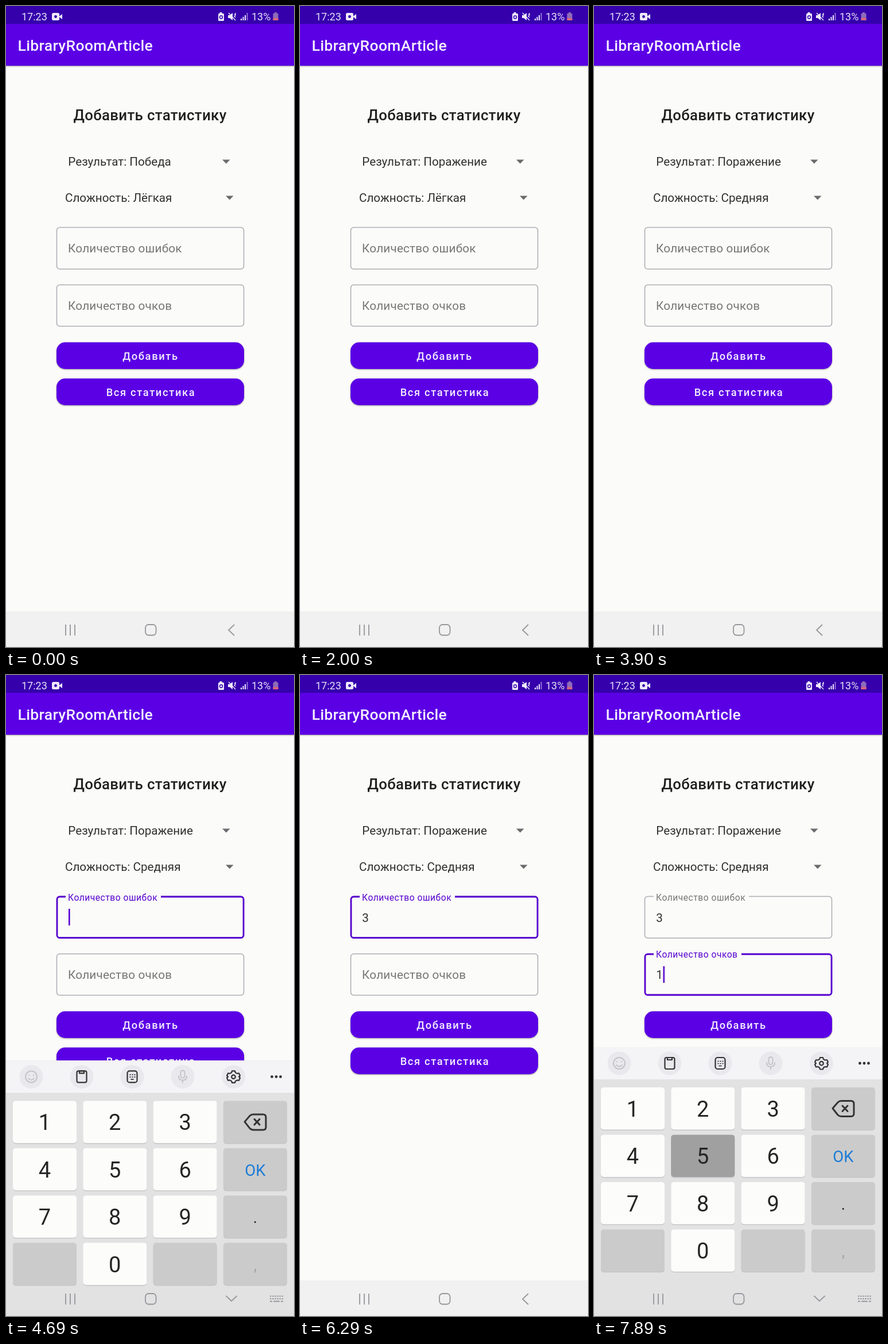
Recreate the animation shown at these times as an HTML page. Size 502x1116 px, loop 7.99 s.

```html
<!DOCTYPE html>
<html lang="ru">
<head>
<meta charset="utf-8">
<title>LibraryRoomArticle</title>
<style>
:root { --page: #fbfbf9; --ink: #303030; --violet: #5b00e5; --accent: #5600d0; --grey: #777; --key: #fcfcfb; --held: #a0a0a0; }
html, body { margin: 0; width: 100%; height: 100%; overflow: hidden; background: var(--page); }
svg { display: block; width: 502px; height: 1116px; font-family: Roboto, "Noto Sans", sans-serif; }

.bar { font-size: 26.5px; font-weight: 500; letter-spacing: .0125em; }
.heading { font-size: 25.8px; font-weight: 500; letter-spacing: .0125em; text-anchor: middle; fill: #202020; }
.item { font-size: 20.65px; fill: var(--ink); }
.label { font-size: 20.7px; letter-spacing: .2px; fill: var(--grey); }
.button { font-size: 18.3px; font-weight: 500; letter-spacing: .0893em; fill: #f3edff; text-anchor: middle; }
.status { font-size: 18px; fill: #e9e3fa; }
.key { font-size: 38px; fill: #252525; text-anchor: middle; }
.small { font-size: 27.5px; }
.page { fill: var(--page); }
.raised { fill: var(--violet); filter: drop-shadow(0 1px .8px #0006); }
.popup { fill: #fcfcfb; filter: drop-shadow(0 5px 9px #0003); }
.line { fill: none; stroke: #96969b; stroke-width: 1.8; }
.dark { fill: none; stroke: #333; stroke-width: 2.2; stroke-linejoin: round; stroke-linecap: round; }
.pale { fill: none; stroke: #c4c4c9; stroke-width: 2; stroke-linecap: round; }
.box { fill: none; stroke: #adadb5; stroke-width: 1.6; }
.focus { fill: none; stroke: var(--accent); stroke-width: 2.8; }
.caret { fill: var(--accent); }
.gap { fill: var(--page); transform-box: fill-box; transform-origin: center; }

/* One shared 7.99 s clock */
[class*="t-"] { animation: 7.99s linear infinite; }
.step { animation-timing-function: step-end !important; }

.t-win { animation-name: win; }
.t-loss { animation-name: loss; }
@keyframes win { 0% { opacity: 1 } 16.27%, 100% { opacity: 0 } }
@keyframes loss { 0% { opacity: 0 } 16.27%, 100% { opacity: 1 } }
.t-easy { animation-name: easy; }
.t-mid { animation-name: mid; }
@keyframes easy { 0% { opacity: 1 } 43.8%, 100% { opacity: 0 } }
@keyframes mid { 0% { opacity: 0 } 43.8%, 100% { opacity: 1 } }

.t-pop1 { animation-name: pop1; }
@keyframes pop1 { 0%, 7.51% { opacity: 0 } 9.39%, 16.3% { opacity: 1 } 18.15%, 100% { opacity: 0 } }
.t-pop2 { animation-name: pop2; }
@keyframes pop2 { 0%, 31.29% { opacity: 0 } 33.17%, 43.8% { opacity: 1 } 45.68%, 100% { opacity: 0 } }

.t-tap1 { animation-name: tap1; }
@keyframes tap1 { 0%, 6.26% { r: 8px; opacity: 0 } 7.51% { r: 22px; opacity: .1 } 9.4%, 11.26% { r: 26px; opacity: .1 } 13.77%, 100% { r: 26px; opacity: 0 } }
.t-tap2 { animation-name: tap2; }
@keyframes tap2 { 0%, 30.04% { r: 8px; opacity: 0 } 31.29% { r: 22px; opacity: .1 } 33.17%, 36.4% { r: 26px; opacity: .1 } 38.8%, 100% { r: 26px; opacity: 0 } }
.t-pick1 { animation-name: pick1; }
@keyframes pick1 { 0%, 13.1% { r: 20px; opacity: 0 } 13.77% { r: 50px; opacity: .1 } 15.02% { r: 89px; opacity: .1 } 16.27% { r: 140px; opacity: .08 } 17.5%, 100% { r: 150px; opacity: 0 } }
.t-pick2 { animation-name: pick2; }
@keyframes pick2 { 0%, 40.7% { r: 20px; opacity: 0 } 41.3% { r: 50px; opacity: .1 } 42.55% { r: 89px; opacity: .1 } 43.8% { r: 140px; opacity: .08 } 45.06%, 100% { r: 150px; opacity: 0 } }

.t-label1 { animation-name: label1; }
@keyframes label1 {
  0%, 53.82% { transform: none; font-size: 20.7px; letter-spacing: .2px; fill: var(--grey) }
  55.94%, 84.98% { transform: translateY(-36.5px); font-size: 15.6px; letter-spacing: .52px; fill: var(--accent) }
  85.2%, 100% { transform: translateY(-36.5px); font-size: 15.6px; letter-spacing: .52px; fill: var(--grey) }
}
.t-label2 { animation-name: label2; }
@keyframes label2 {
  0%, 84.98% { transform: none; font-size: 20.7px; letter-spacing: .2px; fill: var(--grey) }
  87.11%, 100% { transform: translateY(-36.5px); font-size: 15.6px; letter-spacing: .52px; fill: var(--accent) }
}
.t-focus1 { animation-name: focus1; }
@keyframes focus1 { 0% { opacity: 0 } 53.82% { opacity: 1 } 84.98%, 100% { opacity: 0 } }
.t-focus2 { animation-name: focus2; }
@keyframes focus2 { 0% { opacity: 0 } 84.98%, 100% { opacity: 1 } }
.t-gap1 { animation-name: gap1; }
@keyframes gap1 { 0%, 53.82% { transform: scaleX(0) } 55.94%, 100% { transform: none } }
.t-gap2 { animation-name: gap2; }
@keyframes gap2 { 0%, 84.98% { transform: scaleX(0) } 87.11%, 100% { transform: none } }

.t-three { animation-name: three; }
@keyframes three { 0% { opacity: 0 } 66.33%, 100% { opacity: 1 } }
.t-one { animation-name: one; }
@keyframes one { 0% { opacity: 0 } 94.99%, 100% { opacity: 1 } }
.t-caret1 { animation-name: caret1; }
@keyframes caret1 {
  0% { opacity: 0 } 53.82% { opacity: 1 } 60.08% { opacity: 0 }
  66.33% { opacity: 1; transform: translateX(11.5px) } 72.47% { opacity: 0; transform: translateX(11.5px) }
  78.85% { opacity: 1; transform: translateX(11.5px) } 84.98%, 100% { opacity: 0 }
}
.t-caret2 { animation-name: caret2; }
@keyframes caret2 {
  0% { opacity: 0 } 85.5% { opacity: 1 } 91.8% { opacity: 0 }
  94.99%, 100% { opacity: 1; transform: translateX(11.5px) }
}

.t-keys { animation-name: keys; }
@keyframes keys {
  0%, 56.32% { transform: translateY(470px); animation-timing-function: cubic-bezier(.2, .6, .3, 1) }
  60.08%, 74.97% { transform: none; animation-timing-function: cubic-bezier(.4, 0, .7, .6) }
  78.72%, 88.86% { transform: translateY(470px); animation-timing-function: cubic-bezier(.2, .6, .3, 1) }
  91.24%, 100% { transform: none }
}
.t-back { animation-name: back; }
@keyframes back { 0% { opacity: 1 } 56.4% { opacity: 0 } 76% { opacity: 1 } 88.9%, 100% { opacity: 0 } }
.t-down { animation-name: down; }
@keyframes down { 0% { opacity: 0 } 56.4% { opacity: 1 } 76% { opacity: 0 } 88.9%, 100% { opacity: 1 } }

.t-press1 { animation-name: press1; }
@keyframes press1 { 0% { fill: var(--key) } 93.7% { fill: var(--held) } 96.2%, 100% { fill: var(--key) } }
.t-press3 { animation-name: press3; }
@keyframes press3 { 0% { fill: var(--key) } 66.2% { fill: var(--held) } 67.5%, 100% { fill: var(--key) } }
.t-press5 { animation-name: press5; }
@keyframes press5 { 0% { fill: var(--key) } 98.6%, 100% { fill: var(--held) } }
.t-pressOK { animation-name: pressOK; }
@keyframes pressOK { 0% { fill: #cbcbcb } 72.4% { fill: var(--held) } 74.9%, 100% { fill: #cbcbcb } }
.t-ok { animation-name: ok; }
@keyframes ok { 0% { fill: #1b7bd8 } 72.4% { fill: #333 } 74.9%, 100% { fill: #1b7bd8 } }
</style>
</head>
<body>
<svg viewBox="0 0 502 1116">
  <defs>
    <clipPath id="row1"><rect x="87" y="303" width="266" height="62"/></clipPath>
    <clipPath id="row2"><rect x="83" y="364" width="275" height="62"/></clipPath>
  </defs>
  <rect class="page" width="502" height="1116"/>

  <!-- Status and app bar -->
  <rect class="raised" y="30" width="502" height="74"/>
  <rect width="502" height="31" fill="#3500ac"/>
  <text class="status" x="27" y="25">17:23</text>
  <text class="status" x="428" y="25">13%</text>
  <g fill="#eee9fb">
    <rect x="80" y="12" width="13" height="13" rx="2.5"/>
    <path d="M92 18.5 98 14V23Z"/>
    <circle cx="86.5" cy="18.5" r="2.4" fill="#3500ac"/>
    <path d="M372.5 11h4v2h2q1.5 0 1.5 1.5v10q0 1.5-1.5 1.5h-7q-1.5 0-1.5-1.5v-10q0-1.5 1.5-1.5h1z"/>
    <circle cx="375" cy="19.5" r="2.5" fill="none" stroke="#3500ac" stroke-width="1.4"/>
    <path d="M387 16h3l5-4v13l-5-4h-3z"/>
    <path d="M388 12 400 25M398 14l2 2-2 2 2 2M400 12v3" fill="none" stroke="#eee9fb" stroke-width="1.3"/>
    <path d="M409 22h2v3h-2zM412.5 19h2v6h-2zM416 16h2v9h-2z"/>
    <path d="M419.5 12h2v13h-2z" opacity=".5"/>
  </g>
  <path d="M468 11h4v2h2.5v12h-9V13h2.5z" fill="#8f6cb9"/>
  <path d="M465.5 21h9v4h-9z" fill="#d8637c"/>
  <text class="bar" x="20.5" y="78" fill="#f5f0ff">LibraryRoomArticle</text>

  <!-- Form -->
  <text class="heading" x="251" y="199">Добавить статистику</text>
  <circle class="t-tap1" cx="384" cy="271" r="8" opacity="0"/>
  <circle class="t-tap2" cx="389" cy="333.5" r="8" opacity="0"/>
  <path d="M377 267.5h13.5l-6.75 7zM383 330.5h13.5l-6.75 7z" fill="#6b6b6e"/>
  <g class="item">
    <text class="t-win step" x="108.3" y="278">Результат: Победа</text>
    <text class="t-loss step" x="108.3" y="278" opacity="0">Результат: Поражение</text>
    <text class="t-easy step" x="103" y="341">Сложность: Лёгкая</text>
    <text class="t-mid step" x="103" y="341" opacity="0">Сложность: Средняя</text>
  </g>

  <rect class="box" x="88.5" y="385.5" width="326" height="72.5" rx="5"/>
  <rect class="focus t-focus1 step" x="89" y="386" width="325" height="71.5" rx="4.5" opacity="0"/>
  <rect class="gap t-gap1" x="104" y="382" width="166" height="8"/>
  <text class="label t-label1" x="108.1" y="429">Количество ошибок</text>
  <text class="item t-three step" x="108.3" y="430" opacity="0">3</text>
  <rect class="caret t-caret1 step" x="109" y="407" width="2.6" height="29" opacity="0"/>

  <rect class="box" x="88.5" y="485.5" width="326" height="72" rx="5"/>
  <rect class="focus t-focus2 step" x="89" y="486" width="325" height="71" rx="4.5" opacity="0"/>
  <rect class="gap t-gap2" x="104" y="482" width="153" height="8"/>
  <text class="label t-label2" x="108.1" y="528.5">Количество очков</text>
  <text class="item t-one step" x="108.3" y="529" opacity="0">1</text>
  <rect class="caret t-caret2 step" x="109" y="507" width="2.6" height="29" opacity="0"/>

  <g class="raised">
    <rect x="88" y="585.5" width="327" height="46.5" rx="15"/>
    <rect x="88" y="648.5" width="327" height="46.5" rx="15"/>
  </g>
  <text class="button" x="252" y="616">Добавить</text>
  <text class="button" x="252.5" y="679">Вся статистика</text>

  <!-- Drop-down lists -->
  <g class="t-pop1" opacity="0">
    <rect class="popup" x="87" y="238" width="266" height="127"/>
    <g clip-path="url(#row1)"><circle class="t-pick1" cx="219.5" cy="334" r="20" opacity="0"/></g>
    <g class="item">
      <text x="108.3" y="278">Результат: Победа</text>
      <text x="108.3" y="341">Результат: Поражение</text>
    </g>
  </g>
  <g class="t-pop2" opacity="0">
    <rect class="popup" x="83" y="301" width="275.5" height="248"/>
    <g clip-path="url(#row2)"><circle class="t-pick2" cx="220" cy="395" r="20" opacity="0"/></g>
    <g class="item">
      <text x="103.8" y="339">Сложность: Лёгкая</text>
      <text x="103.8" y="402">Сложность: Средняя</text>
      <text x="103.8" y="465">Сложность: Сложная</text>
      <text x="103.8" y="527.5">Сложность: Экспертная</text>
    </g>
  </g>

  <!-- Keyboard -->
  <rect y="1054" width="502" height="62" fill="#f1f1f1"/>
  <g class="t-keys">
    <rect y="648" width="502" height="468" fill="#e2e2e3"/>
    <rect y="648" width="502" height="56" fill="#f4f4f6"/>
    <g fill="#e9e9ed">
      <circle cx="44" cy="676" r="20.5"/><circle cx="132" cy="676" r="20.5"/>
      <circle cx="220" cy="676" r="20.5"/><circle cx="308" cy="676" r="20.5"/>
      <circle cx="396.5" cy="676" r="20.5"/>
    </g>
    <g class="pale">
      <circle cx="44" cy="676" r="10"/>
      <path d="M40 673v.5M48 673v.5M39 679q5 5 10 0"/>
      <rect x="304.5" y="665" width="7" height="13" rx="3.5"/>
      <path d="M301 675q0 7 7 7t7-7M308 682v4"/>
    </g>
    <g class="dark">
      <rect x="123.5" y="666" width="17" height="20" rx="3"/>
      <path d="M128 666v4h8v-4z"/>
      <rect x="211.5" y="666" width="17" height="20" rx="4"/>
      <path d="M216 672.5h1M220 672.5h1M224 672.5h1M216 676.5h1M220 676.5h1M224 676.5h1M218 680.5h4" stroke-width="1.6"/>
      <path d="M394 666h5l1 3 3 1.5 3-.5 2 4-2 2 2 2-2 4.5-3-.5-3 1.5-1 3h-5l-1-3-3-1.5-3 .5-2-4.5 2-2-2-2 2-4 3 .5 3-1.5z"/>
      <circle cx="396.5" cy="676.2" r="3.3"/>
    </g>
    <g fill="#333"><circle cx="463.5" cy="676" r="2.4"/><circle cx="471" cy="676" r="2.4"/><circle cx="478.5" cy="676" r="2.4"/></g>
    <g id="keys"></g>
    <path class="dark" style="stroke-width: 3" d="M416 754.5 425 744q2.5-2.5 6-2.5h17q5 0 5 5v17q0 5-5 5h-17q-3.5 0-6-2.5zM433 750l9 9.5M442 750l-9 9.5"/>
  </g>

  <!-- Navigation bar -->
  <g class="line">
    <path d="M104 1077v19M112 1077v19M120 1077v19"/>
    <rect x="243" y="1077" width="18.5" height="18.5" rx="5.5"/>
    <path class="t-back step" d="M398 1077 388 1086.5 398 1096"/>
    <g class="t-down step" opacity="0">
      <path d="M383.5 1081 393 1090 402.5 1081"/>
      <path d="M460 1081.5h23M460 1086h23" stroke-dasharray="2.5 1.6"/>
      <path d="M460 1090.5h4M466 1090.5h11M479 1090.5h4"/>
    </g>
  </g>
</svg>
<script>
const rows = [["1", "2", "3", "del"], ["4", "5", "6", "OK"], ["7", "8", "9", "."], ["", "0", "", ","]];
const pressed = ["1", "3", "5", "OK"];

function drawKey(name, col, row) {
  const x = 12 + col * 122.3, y = 718 + row * 82.4;
  const digit = /\d/.test(name);
  const press = pressed.includes(name) ? `t-press${name} step` : "";
  const box = (top, fill, cls) =>
    `<rect class="${cls}" x="${x}" y="${top}" width="111" height="73.5" rx="5" fill="${fill}"/>`;
  const cap = box(y + 1.5, "#c6c6c8", "") + box(y, digit ? "var(--key)" : "#cbcbcb", press);
  if (!name || name === "del") return cap;
  const style = name === "OK" ? "key small t-ok step" : digit ? "key" : "key small";
  const tint = name === "," ? ' style="fill:#a4a4a4"' : "";
  return `${cap}<text class="${style}"${tint} x="${x + 55.5}" y="${y + (digit ? 51 : 48)}">${name}</text>`;
}

document.getElementById("keys").innerHTML =
  rows.map((row, r) => row.map((name, c) => drawKey(name, c, r)).join("")).join("");
</script>
</body>
</html>
```
